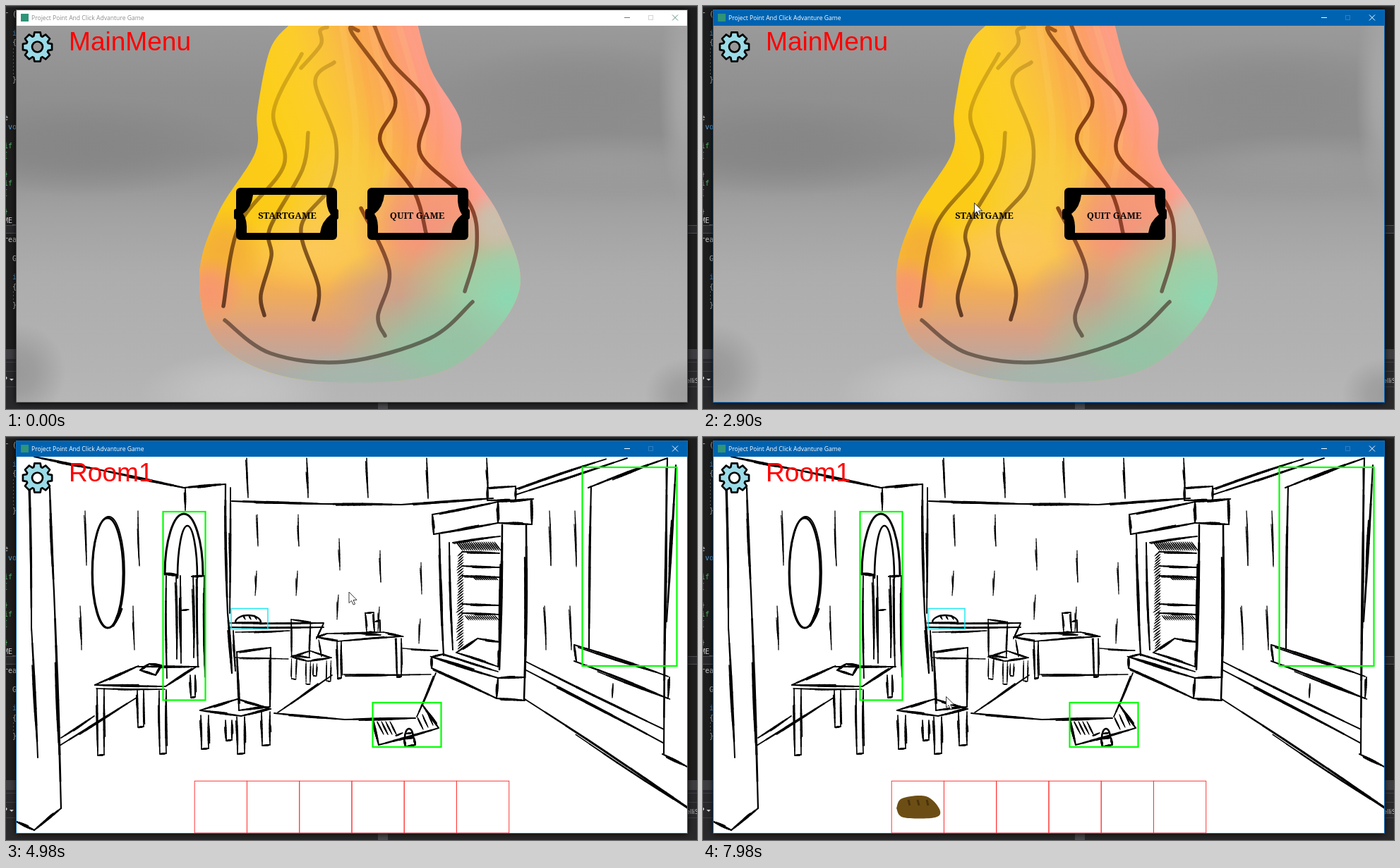
An HTML page with a canvas that plays this animation: 979 px wide and 572 px high, repeating every 8000 ms.

```html
<!DOCTYPE html>
<html lang="en">
<head>
<meta charset="utf-8">
<title>Point and click</title>
<style>
html, body { margin: 0; width: 100%; height: 100%; overflow: hidden; background: #1e1e1e; }
canvas { display: block; }
</style>
</head>
<body>
<canvas id="stage" width="979" height="572"></canvas>
<script>
const W = 979, H = 572, LOOP = 8000;
const stage = document.getElementById('stage').getContext('2d');
let g = stage;

let seed = 7;
function random() {
  seed = (seed * 16807) % 2147483647;
  return seed / 2147483647;
}

const pairs = flat => Array.from({ length: flat.length / 2 }, (_, i) => flat.slice(2 * i, 2 * i + 2));

function rect(x, y, w, h, fill) { g.fillStyle = fill; g.fillRect(x, y, w, h); }

function box(x, y, w, h, color, width) {
  g.strokeStyle = color;
  g.lineWidth = width;
  g.strokeRect(x, y, w, h);
}

function text(s, x, y, font, color, align = 'left') {
  g.font = font;
  g.fillStyle = color;
  g.textAlign = align;
  g.fillText(s, x, y);
}

function polygon(...flat) {
  g.beginPath();
  pairs(flat).forEach(p => g.lineTo(...p));
  g.closePath();
}

// Catmull-Rom curve through key points
function spline(...flat) {
  const p = pairs(flat), last = p.length - 1;
  g.beginPath();
  g.moveTo(...p[0]);
  for (let i = 0; i < last; i++) {
    const a = p[Math.max(0, i - 1)], b = p[i], c = p[i + 1], d = p[Math.min(last, i + 2)];
    g.bezierCurveTo(b[0] + (c[0] - a[0]) / 6, b[1] + (c[1] - a[1]) / 6,
      c[0] - (d[0] - b[0]) / 6, c[1] - (d[1] - b[1]) / 6, ...c);
  }
}

function blob(x, y, rx, ry, color) {
  g.save();
  g.translate(x, y);
  g.scale(rx, ry);
  const grad = g.createRadialGradient(0, 0, 0, 0, 0, 1);
  grad.addColorStop(0, color);
  grad.addColorStop(.4, color + 'cc');
  grad.addColorStop(1, color + '00');
  g.fillStyle = grad;
  g.fillRect(-1, -1, 2, 2);
  g.restore();
}

// Linear gradient with evenly spaced colours
function ramp(x0, y0, x1, y1, ...colors) {
  const grad = g.createLinearGradient(x0, y0, x1, y1);
  colors.forEach((c, i) => grad.addColorStop(i / (colors.length - 1), c));
  return grad;
}

function layer(draw) {
  const c = document.createElement('canvas');
  c.width = W;
  c.height = H;
  g = c.getContext('2d');
  draw();
  g = stage;
  return c;
}

// A layer limited to the inside of the window
const scene = draw => layer(() => {
  g.beginPath();
  g.rect(15, 28, 950, 534);
  g.clip();
  g.lineCap = 'round';
  draw();
});

// ---- desktop and window ----
function drawDesk() {
  rect(0, 0, W, H, '#1e1e1e');
  rect(0, 0, W, 2, '#2d2d30');
  rect(0, 311, W, 12, '#4e4e52');
  rect(0, 312, W, 10, '#29292c');
  rect(0, 487, W, 14, '#3e3e42');
  rect(0, 501, W, 71, '#2a2a2d');
  for (const y of [505, 518, 540]) rect(0, y, W, 1, '#404044');
  rect(527, 563, 14, 9, '#4b4b50');
  const rows = 'r (||  i|  {||||  }||||e| vo||if|[||}|if|[||}|ME_||rea||  G||  i|  {||  }'.split('|');
  rows.forEach((s, i) => {
    const color = i > 13 && i < 22 ? '#4fae62' : /vo|^ +i$/.test(s) ? '#569cd6' : '#c8c8c8';
    text(s, -3, 15 + 13.33 * i, '10px "DejaVu Sans Mono", monospace', color);
  });
  for (let y = 60; y < 98; y += 5) rect(10, y, 1, 2, '#666');
  for (let y = 405; y < 420; y += 5) rect(10, y, 1, 2, '#666');
  text('?', -3, 534, 'bold 10px "Open Sans", sans-serif', '#ddd');
  polygon(5, 529, 11, 529, 8, 532);
  g.fill();
  text('elliS', 964, 535, '9px "Open Sans", sans-serif', '#ccc');
  g.shadowColor = '#000';
  g.shadowBlur = 9;
  rect(15, 6, 950, 557, '#111');
  g.shadowBlur = 0;
}

function drawTitleBar(active) {
  const ink = active ? '#fff' : '#777';
  rect(14, 5, 952, 558, active ? '#0f6fbd' : '#555');
  rect(15, 6, 950, 22, active ? '#0063b1' : '#fff');
  rect(21, 11, 11, 11, '#2f9478');
  text('Project Point And Click Advanture Game', 36, 20, '8.6px "Open Sans", sans-serif', active ? '#fff' : '#8d8d8d');
  rect(876, 16, 8, 1, ink);
  box(910.5, 13.5, 6, 6, active ? '#2f7fc0' : '#d4d4d4', 1);
  g.strokeStyle = active ? '#fff' : '#5d8f80';
  g.beginPath();
  g.moveTo(944, 12.5); g.lineTo(952, 20.5);
  g.moveTo(952, 12.5); g.lineTo(944, 20.5);
  g.stroke();
}

function drawGear() {
  g.save();
  g.translate(44.5, 58);
  g.beginPath();
  for (let i = 0; i < 32; i++) {
    const side = i % 4, r = side % 3 ? 21 : 16;
    const a = (i - side) * Math.PI / 16 + [-.33, -.2, .2, .33][side];
    g.lineTo(r * Math.sin(a), -r * Math.cos(a));
  }
  g.closePath();
  g.moveTo(7.5, 0);
  g.arc(0, 0, 7.5, 0, 7);
  g.fillStyle = '#9bdbe8';
  g.fill('evenodd');
  g.lineJoin = 'round';
  g.strokeStyle = '#000';
  g.lineWidth = 2.7;
  g.stroke();
  g.restore();
}

function drawHeading(s) {
  drawGear();
  text(s, 89, 63, '37.1px "Liberation Sans", Arial, sans-serif', '#f00');
}

// ---- main menu ----
function drawBackdrop() {
  rect(15, 28, 950, 534, ramp(0, 28, 0, 562, '#9a9a9a', '#909090', '#8d8d8d', '#a2a2a2', '#adadad', '#b1b1b1', '#b6b6b6'));
  blob(110, 200, 230, 70, '#868686');
  blob(810, 130, 200, 80, '#8b8b8b');
  blob(860, 230, 230, 50, '#9b9b9b');
  blob(965, 120, 40, 170, '#a8a8a8');
  blob(15, 520, 70, 70, '#999999');
  blob(965, 550, 60, 50, '#9d9d9d');
  blob(330, 550, 140, 60, '#c3c3c3');
}

function drawPear() {
  g.save();
  spline(402, 26, 374, 62, 356, 150, 353, 208, 300, 295, 274, 385, 300, 477, 405, 528, 572, 530,
    665, 490, 728, 400, 700, 300, 648, 218, 643, 160, 603, 92, 583, 26);
  g.clip();
  rect(270, 28, 465, 505, ramp(365, 230, 645, 130, '#fbcb17', '#fcce1c', '#fccd2a', '#f9c03f', '#fba955', '#fd9c7c', '#fca3a0'));
  g.lineWidth = 9;
  for (let i = 0; i < 6; i++) {
    g.strokeStyle = i % 2 ? 'rgba(255,130,60,.09)' : 'rgba(255,225,130,.13)';
    spline(476 + i * 20, 25, 495 + i * 24, 170, 490 + i * 20, 300);
    g.stroke();
  }
  blob(475, 275, 85, 100, '#f8cb45');
  rect(270, 28, 465, 505, ramp(0, 320, 0, 530, '#f5a86000', '#f3a268aa', '#d69e8cee', '#a9aeac'));
  blob(440, 345, 115, 65, '#fcc858');
  blob(590, 315, 100, 95, '#f3957f');
  blob(310, 345, 55, 60, '#f4ae38');
  blob(288, 405, 50, 50, '#f7976f');
  blob(560, 420, 110, 80, '#cda18a');
  blob(710, 415, 150, 135, '#8bd8b2');
  blob(610, 490, 140, 85, '#93c4a5');
  blob(690, 305, 40, 45, '#c9c0ad');
  blob(500, 525, 120, 35, '#a5b7ac');
  g.restore();
}

function vein(...flat) {
  spline(...flat);
  g.stroke();
}

function drawVeins() {
  g.lineWidth = 5.5;
  g.strokeStyle = ramp(0, 30, 0, 440, '#7a500048', '#7a500050', '#6a400070', '#4a2000a8', '#38180cc0');
  vein(455, 30, 445, 35, 446, 55, 418, 88);
  vein(419, 68, 379, 150, 394, 225, 330, 312, 308, 426);
  vein(428, 180, 420, 232, 374, 315, 376, 355, 361, 410, 366, 439);
  vein(465, 80, 438, 108, 467, 190, 460, 255, 418, 315, 443, 400, 436, 445);
  g.strokeStyle = ramp(0, 30, 0, 500, '#6a2a00a0', '#6a2600cc', '#701e00c0', '#4a201aa0', '#302a2090');
  vein(499, 35, 490, 38, 551, 130, 530, 192, 579, 265, 595, 322);
  vein(522, 28, 545, 78, 597, 140, 587, 210, 655, 278, 667, 340, 650, 405);
  vein(503, 287, 543, 375, 527, 440, 537, 468);
  vein(310, 446, 375, 493, 480, 505, 600, 472, 661, 420);
}

function drawTicket(dx) {
  g.save();
  g.translate(dx, 0);
  g.fillStyle = '#000';
  g.beginPath();
  g.roundRect(326, 258, 143, 74, 6);
  g.moveTo(350, 268);
  g.quadraticCurveTo(348, 286, 336, 295);
  g.quadraticCurveTo(342, 303, 341, 322);
  g.lineTo(445, 322);
  g.quadraticCurveTo(447, 306, 460, 296);
  g.quadraticCurveTo(453, 286, 454, 268);
  g.fill('evenodd');
  for (const x of [323, 461]) {
    g.beginPath();
    g.roundRect(x, 288, 10, 15, 3);
    g.fill();
  }
  g.restore();
}

function drawMenu(pressed) {
  drawBackdrop();
  drawPear();
  drawVeins();
  if (!pressed) drawTicket(0);
  drawTicket(186);
  const font = 'bold 13px "Noto Serif", serif';
  text('STARTGAME', 398.5, 302, font, '#0c0804', 'center');
  text('QUIT GAME', 582.5, 302, font, '#0c0804', 'center');
  drawHeading('MainMenu');
}

function drawDialog() {
  rect(15, 28, 950, 534, '#fff');
  box(920.3, 28.5, 37.5, 37.5, '#0f0', 2.2);
  text('Skip', 928, 44, '8.9px "Liberation Sans", Arial, sans-serif', '#200');
  drawHeading('Dialog');
}

// ---- room sketch ----
// One brush mark: thick in the middle, slightly bowed
function mark(x0, y0, x1, y1, w) {
  const dx = x1 - x0, dy = y1 - y0, bow = (random() - .5) * .016, n = 8;
  const at = u => {
    const b = bow * Math.sin(Math.PI * u);
    return [x0 + dx * u - dy * b, y0 + dy * u + dx * b];
  };
  for (let i = 0; i < n; i++) {
    g.lineWidth = w * (.6 + .5 * Math.sin(Math.PI * (i + .5) / n));
    g.beginPath();
    g.moveTo(...at(i / n));
    g.lineTo(...at((i + 1) / n));
    g.stroke();
  }
}

// Straight hand-drawn runs, each partly gone over a second time
function pen(w, ...flat) {
  const p = pairs(flat);
  for (let i = 1; i < p.length; i++) {
    const [[ax, ay], [bx, by]] = [p[i - 1], p[i]];
    const len = Math.hypot(bx - ax, by - ay), u = random() * .4, v = .65 + random() * .4;
    const shift = len > 25 ? 1.6 : .6;
    const nx = -(by - ay) / len * shift, ny = (bx - ax) / len * shift;
    mark(ax, ay, bx, by, w);
    mark(ax + (bx - ax) * u + nx, ay + (by - ay) * u + ny, ax + (bx - ax) * v, ay + (by - ay) * v, w * .8);
  }
}

const shape = (w, ...flat) => pen(w, ...flat, flat[0], flat[1]);
const leg = (x, y, w, h) => pen(2.4, x, y, x + 1, y + h, x + w, y + h - 1, x + w, y);

function arch(w, x, y, rx, ry, from = Math.PI, to = 2 * Math.PI) {
  g.lineWidth = w;
  g.beginPath();
  g.ellipse(x, y, rx, ry, 0, from, to);
  g.stroke();
}

// Right-wall edges run away from the vanishing point
const EYE = { x: 434, y: 170 };
function receding(x, y, far) {
  pen(2.8, x, y, far, EYE.y + (y - EYE.y) * (far - EYE.x) / (x - EYE.x));
}

function drawWalls() {
  pen(2.8, 33, 45, 36, 270, 45, 455);
  pen(3.2, 62, 72, 68, 220, 78, 527, 40, 558, 15, 546);
  pen(3.2, 40, 28, 130, 46, 252, 72, 311, 67, 314, 250, 320, 335);
  pen(2.4, 254, 72, 254, 104);
  pen(2.6, 318, 72, 317, 250);
  pen(3.2, 320, 91, 450, 95, 560, 96, 690, 87);
  pen(2.6, 78, 427, 125, 396);
  pen(2.6, 76, 438, 185, 370);
  for (const y of [318, 330]) receding(735, y, 932);
  receding(735, 372, 965);
  receding(722, 74, 850);
  pen(2.8, 722, 82, 880, 30);
  pen(3, 930, 450, 965, 468);
  pen(3, 885, 470, 965, 525);
}

function drawWindow() {
  pen(3, 825, 72, 937, 30, 932, 450);
  pen(3, 829, 70, 826, 300);
  pen(3, 949, 40, 936, 262);
  for (const y of [295, 318]) receding(805, y, 938);
  pen(2.6, 805, 295, 808, 318);
  pen(2.6, 940, 341, 938, 370);
}

function drawWallMarks() {
  for (let i = 0; i < 5; i++) {
    const x = 356 + 58 * i, y = 110 + 17 * i * (i > 1);
    pen(1.6, x, y, x + 1, y + 45);
    pen(1.6, x - 1, y + 80, x - 3, y + 115);
    pen(2.2, 341 + 85 * i, 30, 343 + 85 * i, 86);
  }
  for (const x of [112, 187, 770, 806]) {
    pen(1.8, x, 105, x + 2, 182);
    pen(1.8, x - 7, 240, x - 5, 302);
  }
  pen(2, 860, 350, 859, 370);
  arch(2.8, 144, 193, 22, 78, 0, 7);
  arch(1.8, 145.5, 192, 22.5, 79, 0, 7);
  pen(4, 164, 244, 152, 268);
}

function drawDoor() {
  arch(3, 252, 195, 27, 86);
  arch(2.6, 257, 200, 14, 74);
  for (const x of [227, 241, 247, 265, 271, 281]) pen(2.6, x, 197, x + 1, 310 + random() * 40);
  pen(4, 225, 194, 243, 196);
  pen(3, 263, 198, 281, 197);
  pen(2, 247, 246, 259, 245);
}

function drawChair(x, y, sx, sy, w) {
  g.save();
  g.translate(x, y);
  g.scale(sx, sy);
  shape(w, -48, 6, 0, 0, -1, 84, -45, 89);
  shape(w, -100, 89, -47, 73, 0, 87, -42, 97);
  leg(-99, 96, 11, 48);
  leg(-48, 98, 11, 53);
  leg(-13, 91, 12, 48);
  leg(-64, 103, 9, 29);
  g.restore();
}

function drawTables() {
  shape(2.8, 126, 352, 185, 326, 270, 326, 226, 354);
  pen(2.2, 128, 357, 225, 358);
  leg(129, 357, 10, 95);
  leg(217, 360, 10, 90);
  leg(186, 358, 9, 54);
  leg(261, 338, 7, 32);
  shape(3, 190, 331, 203, 322, 220, 324, 212, 338);

  for (const y of [264, 270]) pen(2.6, 318, y, 450, y);
  pen(2, 325, 277, 402, 275);
  pen(2.6, 322, 275, 325, 332);
  pen(2, 450, 265, 440, 286);
  arch(2.4, 343, 263, 18, 10);
  pen(2, 325, 263, 361, 263);
  for (const x of [336, 344, 352]) pen(1.6, x, 253, x + 3, 259);

  shape(2.4, 440, 284, 455, 279, 535, 277, 562, 283, 470, 290);
  leg(469, 290, 6, 53);
  leg(553, 286, 7, 55);
  pen(1.8, 443, 288, 447, 312);
  pen(2, 478, 337, 555, 338);
  shape(2, 509, 250, 521, 249, 522, 277, 511, 277);
  pen(2, 523, 262, 530, 260, 530, 277);
  pen(2.4, 500, 279, 531, 281);
  pen(1.8, 325, 313, 400, 315);
  pen(1.8, 562, 300, 612, 303);
}

function drawBookcase() {
  shape(3, 604, 110, 697, 92, 697, 122, 606, 138);
  shape(3, 697, 92, 745, 88, 745, 124, 697, 122);
  shape(2.6, 682, 72, 722, 70, 722, 90, 682, 90);
  pen(3.2, 614, 138, 620, 310);
  pen(2.8, 628, 150, 633, 302);
  pen(3.6, 703, 125, 699, 330);
  pen(3.6, 737, 125, 734, 372);
  pen(2.6, 633, 150, 700, 141);
  for (const y of [163, 183, 197, 237, 250]) pen(2.6, 646, y, 699, y + 2);
  shape(2.6, 638, 306, 668, 286, 700, 291, 697, 326);
  pen(2.6, 603, 312, 620, 308, 697, 333);
  pen(3, 735, 341, 697, 342, 603, 312, 603, 328, 695, 371, 735, 374);
  pen(2.8, 697, 342, 695, 371);
  for (let x = 638; x < 694; x += 3) {
    mark(x, 149, x + 9, 161, 1.5);
    if (x > 648) mark(x, 253, x + 6, 260, 1.2);
    if (x > 660) mark(x, 199, x + 5, 203, 1.2);
  }
  for (let y = 164; y < 300; y += 4) mark(638 + random() * 3, y + 5, 648, y - 2, 1.4);
}

function drawRug() {
  pen(2.4, 462, 338, 385, 391);
  pen(2.8, 380, 392, 480, 401, 580, 399);
  pen(2, 480, 338, 602, 337);
  pen(2.6, 609, 335, 582, 397);
  pen(3, 520, 401, 528, 437, 613, 413, 590, 380);
  for (let i = 0; i < 4; i++) {
    pen(1.8, 526 + 6 * i, 404, 535 + 6 * i, 422);
    if (i) pen(1.8, 576 + 7 * i, 402 - 4 * i, 584 + 7 * i, 418 - 3 * i);
  }
  pen(2, 552, 424, 562, 420);
  shape(2.8, 564, 428, 578, 427, 580, 437, 566, 440);
  arch(2.6, 571, 427, 6, 13);
  pen(2, 566, 421, 576, 420);
}

function drawRoom() {
  rect(15, 28, 950, 534, '#fff');
  g.strokeStyle = '#000';
  drawWalls();
  drawWindow();
  drawWallMarks();
  drawDoor();
  drawTables();
  drawChair(375, 299, 1, 1, 2.8);
  drawChair(404, 259, -.57, .61, 3.8);
  drawBookcase();
  drawRug();
  box(222.5, 106, 60, 267.5, '#0f0', 2.2);
  box(519.5, 377, 97, 63, '#0f0', 2.2);
  box(816.5, 43, 134, 282, '#0f0', 2.2);
  box(319, 243.5, 52, 29, '#20e8f0', 1.5);
  for (let i = 0; i < 6; i++) box(267.2 + i * 74.25, 488.3, 74.25, 73.7, '#ff3838', 1);
  drawHeading('Room1');
}

function drawLoaf() {
  g.fillStyle = '#6c4e15';
  spline(274, 527, 282, 513, 316, 510, 335, 528, 329, 540, 284, 540, 274, 527);
  g.fill();
  g.strokeStyle = '#49330c';
  g.lineWidth = 3;
  for (const x of [291, 304, 317]) {
    spline(x, 515, x + 2, 523);
    g.stroke();
  }
}

// ---- pointer ----
// Start and end time, then evenly timed waypoints; each move begins where the last one ended
const BEAT = 76, ENTRY = [967, 567];
const MOVES = [
  [610, 1370, 820, 460, 680, 340, 555, 240, 445, 162],
  [1620, 2360, 432, 268, 380, 262, 327, 250, 361, 260],
  [2450, 2670, 384, 279],
  [3360, 4130, 560, 215, 760, 130, 941, 54],
  [4440, 5210, 760, 115, 580, 185, 476, 223, 513, 183],
  [5290, 5440, 571, 215, 560, 245, 541, 238],
  [5590, 6360, 538, 300, 534, 370, 470, 391, 358, 265],
  [6440, 6520, 345, 254],
  [6980, 7750, 315, 390, 298, 500, 316, 534],
  [7830, 7980, 344, 368]
];

function along(way, u) {
  const s = u * (way.length - 1), i = Math.min(way.length - 2, Math.floor(s));
  return way[i].map((a, axis) => a + (way[i + 1][axis] - a) * (s - i));
}

function pointerAt(t) {
  let at = ENTRY;
  for (const [start, end, ...flat] of MOVES) {
    if (t < start) break;
    const gaps = Math.round((end - start) / BEAT);
    const step = Math.min(gaps, Math.floor((t - start) * gaps / (end - start) + 1e-6));
    at = along([at, ...pairs(flat)], (step + 1) / (gaps + 1));
  }
  return at;
}

function drawPointer([x, y], tinted) {
  g.save();
  g.translate(x + .5, y + .5);
  polygon(0, 0, 0, 15.5, 3.5, 12.3, 6.2, 18, 8.6, 17, 6.1, 11.4, 11, 11.2);
  g.fillStyle = tinted ? '#fff8e6' : '#fff';
  g.fill();
  g.strokeStyle = tinted ? '#5a4020' : '#222';
  g.lineWidth = .9;
  g.stroke();
  g.restore();
}

function drawHalo(x, y) {
  g.fillStyle = 'rgba(240,216,60,.7)';
  g.beginPath();
  g.arc(x, y, 11, 0, 7);
  g.fill();
}

const [idleFrame, liveFrame] = [false, true].map(on => layer(() => { drawDesk(); drawTitleBar(on); }));
const [menu, menuPressed] = [false, true].map(on => scene(() => drawMenu(on)));
const dialog = scene(drawDialog);
const room = scene(drawRoom);

function render(t) {
  g.drawImage(t < 1450 ? idleFrame : liveFrame, 0, 0);
  g.drawImage(t < 2840 ? menu : t < 2980 ? menuPressed : t < 4130 ? dialog : room, 0, 0);
  if (t >= 6670) drawLoaf();
  if (t >= 4130 && t < 4210) drawHalo(940, 55);
  if (t >= 6670 && t < 6750) drawHalo(345, 254);
  if (t >= MOVES[0][0]) drawPointer(pointerAt(t), t >= 2980 && t < 3360);
}

const begin = performance.now();
function tick() {
  render((performance.now() - begin) % LOOP);
  requestAnimationFrame(tick);
}
tick();
</script>
</body>
</html>
```
